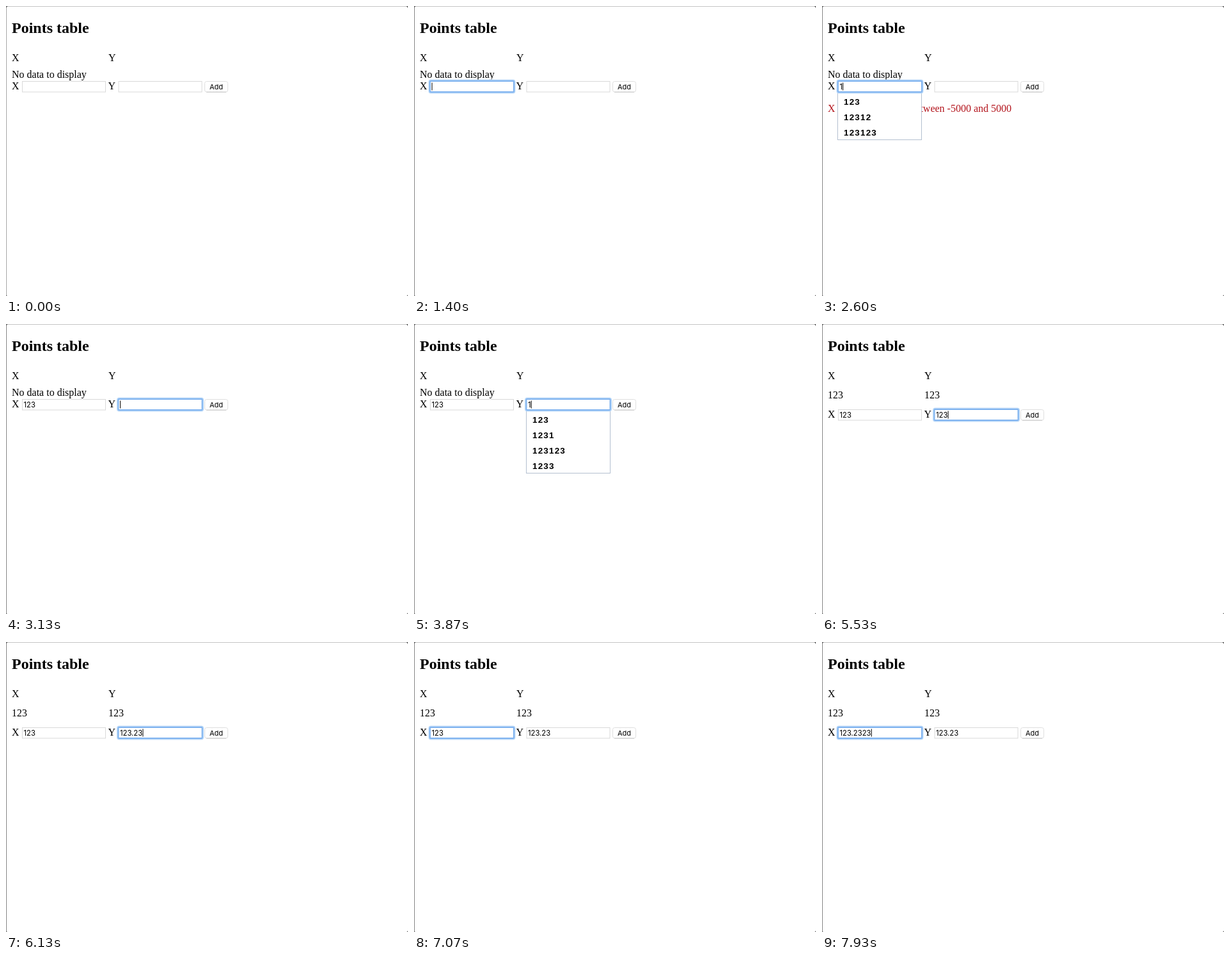
These frames come from a looping animation (628 by 452 pixels, 8000 ms). An HTML page:

```html
<!DOCTYPE html>
<html lang="en">
<head>
<meta charset="utf-8">
<title>Points table</title>
<style>
html, body { margin: 0; width: 100%; height: 100%; overflow: hidden; background: #fff; }
svg { display: block; width: 100vw; height: 100vh; }
text { font: 16px "Liberation Serif", "Times New Roman", serif; white-space: pre; }
.title { font-size: 24px; font-weight: bold; }
.error { fill: #b3141c; }
.field text, .button text { font: 11.3px Inter, "Liberation Sans", sans-serif; }
.button text { font-size: 11px; }
.box { fill: #fff; stroke: #d9d9d9; }
.glow { fill: none; stroke: #b9d8f8; stroke-width: 4; }
.ring { fill: #fff; stroke: #80b3ef; stroke-width: 2; }
.list rect { fill: #fff; stroke: #b4c0d0; }
.list text { font: bold 13.5px "Liberation Sans", Arial, sans-serif; letter-spacing: 1.15px; }
</style>
</head>
<body>
<svg viewBox="0 0 628 452" id="stage"></svg>
<script>
const LOOP = 8000;
const NS = "http://www.w3.org/2000/svg";
const stage = document.getElementById("stage");

// Each entry changes part of the state from its time on.
const steps = [
  [0, { x: "", y: "", focus: "", caret: false, list: "", error: "", added: false, edge: "#a6a6a6" }],
  [330, { edge: "#858585" }],
  [1400, { focus: "x", caret: true }],
  [1800, { caret: false }],
  [2270, { caret: true }],
  [2530, { x: "1", list: "x" }],
  [2595, { error: "X" }],
  [2670, { x: "12", error: "" }],
  [2730, { x: "123" }],
  [3000, { focus: "y", list: "" }],
  [3530, { caret: false }],
  [3865, { y: "1", list: "y", caret: true }],
  [3930, { error: "Y" }],
  [4000, { y: "12", error: "" }],
  [4130, { y: "123" }],
  [4530, { focus: "", list: "" }],
  [4600, { added: true }],
  [5525, { focus: "y" }],
  [5930, { y: "123." }],
  [6000, { y: "123.2", error: "Y" }],
  [6070, { y: "123.23" }],
  [6130, { error: "" }],
  [6530, { focus: "x" }],
  [7000, { caret: false }],
  [7270, { x: "123.", caret: true }],
  [7335, { error: "X" }],
  [7400, { x: "123.2" }],
  [7470, { error: "" }],
  [7530, { x: "123.23" }],
  [7800, { x: "123.232" }],
  [7925, { x: "123.2323" }]
];

function add(parent, tag, attrs = {}, content = "") {
  const node = document.createElementNS(NS, tag);
  for (const name in attrs) node.setAttribute(name, attrs[name]);
  node.textContent = content;
  return parent.appendChild(node);
}

const label = (parent, x, y, content, cls = "") => add(parent, "text", { x, y, class: cls }, content);
const rect = (parent, x, y, width, height, attrs) => add(parent, "rect", { x, y, width, height, ...attrs });
const show = (node, on) => node.setAttribute("visibility", on ? "inherit" : "hidden");

function makeField(parent, left, name) {
  const group = add(parent, "g", { class: "field" });
  label(parent, left - 16, 130, name);
  rect(group, left + 0.5, 117.5, 130, 16.5, { class: "box" });
  const focus = add(group, "g");
  rect(focus, left - 0.5, 116.5, 132, 18, { class: "glow", rx: 2 });
  rect(focus, left, 117, 131, 17, { class: "ring", rx: 1 });
  const value = label(group, left + 2.4, 130, "");
  const caret = rect(group, 0, 119.5, 1, 12, { fill: "#000" });

  return (content, focused, blinkOn) => {
    value.textContent = content;
    show(focus, focused);
    show(caret, focused && blinkOn);
    const width = content ? value.getComputedTextLength() : 0;
    caret.setAttribute("x", left + 2.6 + width);
  };
}

function makeList(left, items) {
  const group = add(stage, "g", { class: "list" });
  rect(group, left + 0.5, 135.5, 131, items.length * 24 + 1, {});
  items.forEach((item, i) => label(group, left + 10, 153.8 + i * 24, item));
  return group;
}

rect(stage, 0, 0, 628, 452, { fill: "#fff" });
label(stage, 9, 42, "Points table", "title");
label(stage, 9, 86, "X");
label(stage, 160, 86, "Y");
const empty = label(stage, 9, 112, "No data to display");
const row = add(stage, "g");
label(row, 9, 116, "123");
label(row, 160, 116, "123");

const form = add(stage, "g");
const error = label(form, 9, 165, "", "error");
const lists = {
  x: makeList(24, ["123", "12312", "123123"]),
  y: makeList(175, ["123", "1231", "123123", "1233"])
};
stage.appendChild(form);
// Suggestions cover the message but sit under the focus ring.
stage.insertBefore(error, lists.x);
const fields = { x: makeField(form, 25, "X"), y: makeField(form, 175.5, "Y") };

const button = add(form, "g", { class: "button" });
rect(button, 310.5, 117.5, 36, 16.5, { rx: 3, fill: "#fff", stroke: "#dfdfdf" });
add(button, "path", { d: "M313 134.2H344", stroke: "#c9c9c9" });
label(button, 318, 130, "Add");

rect(stage, 0, 0, 628, 1, { fill: "#c4c4c4" });
const edge = rect(stage, 0, 0, 1, 452, {});
add(stage, "path", { d: "M0 0h3L0 3zM628 0h-3l3 3zM0 452h2l-2-2zM628 452h-2l2-2z", fill: "#777" });

function draw(time) {
  const state = {};
  for (const [start, change] of steps) if (start <= time) Object.assign(state, change);

  for (const key of ["x", "y"]) {
    fields[key](state[key], state.focus === key, state.caret);
    show(lists[key], state.list === key);
  }
  show(empty, !state.added);
  show(row, state.added);
  error.textContent = state.error && `${state.error} has to be number between -5000 and 5000`;
  error.setAttribute("y", state.added ? 181 : 165);
  form.setAttribute("transform", `translate(0 ${state.added ? 16 : 0})`);
  edge.setAttribute("fill", state.edge);
}

const origin = performance.now();
function tick() {
  draw((performance.now() - origin) % LOOP);
  requestAnimationFrame(tick);
}
tick();
</script>
</body>
</html>
```
